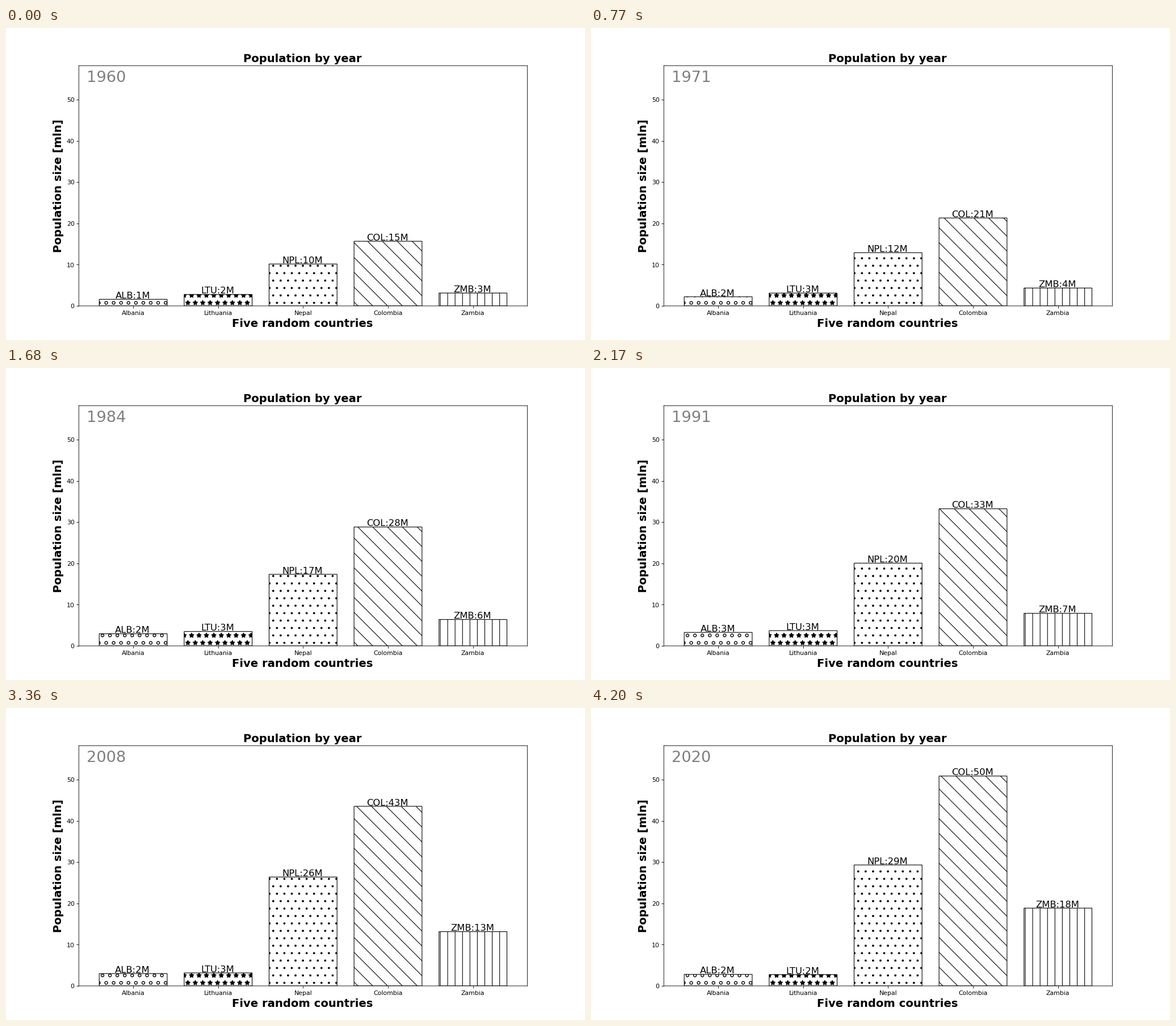
Recreate the animation shown at these times as a matplotlib script. Size 1020 px wide and 549 px high, loop 4.27 s.

```python
import numpy as np
import matplotlib.pyplot as plt
from matplotlib.animation import FuncAnimation
from matplotlib.patches import PathPatch
from matplotlib.path import Path
from matplotlib.transforms import Affine2D

W, H = 1020, 549
DPI = 100 * W / 1300
CELL_X, CELL_Y = W / 78, H / 42     # hatch grid in pixels
START = 1960
HALF = 0.4                          # half a bar's width

plt.rcParams["font.family"] = "DejaVu Sans"
plt.rcParams["path.snap"] = False


def trend(*points):
    """Population in millions, straight between (year, value) points."""
    years, values = zip(*points)
    return lambda year: np.interp(year, years, values)


def growth(start, rate):
    return lambda year: start * np.exp(rate * (year - START))


# Hatches are built in grid cells, counted from the top left of the figure
def staggered(shape, radius):
    def build(cols, rows):
        return Path.make_compound_path(*[
            Path(shape.vertices * (radius, -radius) + (c + r % 2 / 2, r), shape.codes)
            for r in rows for c in cols])
    return build


def diagonals(cols, rows):
    a, b = rows[0], rows[-1]
    return Path.make_compound_path(*[
        Path([(a + 2 * k, a), (b + 2 * k, b)]) for k in range(-5, 30)])


def verticals(cols, rows):
    return Path.make_compound_path(*[
        Path([(c + 0.5, rows[0]), (c + 0.5, rows[-1])]) for c in cols])


circle, star = Path.unit_circle(), Path.unit_regular_star(5)

# code, name, population, hatch, hatch is filled, hatch line width
COUNTRIES = [
    ("ALB", "Albania", trend((1960, 1.6), (1990, 3.29), (2020, 2.8)),
     staggered(circle, 0.19), False, 1.24),
    ("LTU", "Lithuania", trend((1960, 2.78), (1991, 3.71), (2020, 2.76)),
     staggered(star, 1 / 3), True, 1),
    ("NPL", "Nepal", trend((1960, 10.17), (1975, 13.9), (1991, 20.08),
                           (2002, 25.4), (2015, 27.61), (2020, 29.35)),
     staggered(circle, 0.1), True, 1),
    ("COL", "Colombia", trend((1960, 15.69), (1977, 24.42), (1991, 33.28),
                              (2003, 41.06), (2015, 47.12), (2020, 50.93)),
     diagonals, False, 1),
    ("ZMB", "Zambia", growth(3.12, 0.03), verticals, False, 1),
]

fig, ax = plt.subplots(figsize=((W + 0.01) / DPI, (H + 0.01) / DPI), dpi=DPI)
fig.subplots_adjust(left=163.5 / 1300, right=1170.5 / 1300,
                    bottom=76.5 / 700, top=615.5 / 700)
ax.set_xlim(-0.64, 4.64)
ax.set_ylim(0, 58.3)
heading = dict(fontsize=18, fontweight="bold")
ax.set_title("Population by year", x=0.499, **heading)
ax.set_xlabel("Five random countries", x=0.499, **heading)
ax.set_ylabel("Population size [mln]", **heading)
ax.set_xticks(range(5), [country[1] for country in COUNTRIES])
year_text = ax.text(0.0608, 0.931, "", transform=ax.transAxes, fontsize=25,
                    color="gray", ha="center")

to_pixels = Affine2D().scale(CELL_X, -CELL_Y).translate(0, H)
above_bar = ax.transData + Affine2D().translate(-0.9, 1.4)
bars = ax.bar(range(5), [1] * 5, 2 * HALF, facecolor="none", edgecolor="black",
              linewidth=1, zorder=2)
labels, hatches = [], []
for i, (_, _, _, build, fill, width) in enumerate(COUNTRIES):
    labels.append(ax.text(i, 0, "", transform=above_bar, fontsize=15,
                          ha="center", zorder=3))
    left, right = ax.transData.transform([(i - HALF, 0), (i + HALF, 0)])[:, 0] / CELL_X
    shape = build(range(int(left) - 1, int(right) + 2), range(4, 40))
    hatch = PathPatch(shape, transform=to_pixels, fill=fill, facecolor="black",
                      edgecolor="black", linewidth=width, zorder=1.5)
    hatches.append(ax.add_artist(hatch))


def update(frame):
    year = START + frame
    year_text.set_text(str(year))
    for country, bar, hatch, label in zip(COUNTRIES, bars, hatches, labels):
        code, _, population = country[:3]
        value = population(year)
        bar.set_height(value)
        hatch.set_clip_path(bar)
        label.set_y(value)
        label.set_text(f"{code}:{int(value)}M")
    return [year_text, *bars, *hatches, *labels]


anim = FuncAnimation(fig, update, frames=61, interval=70, repeat=True,
                     repeat_delay=0, blit=False)
plt.show()
```
